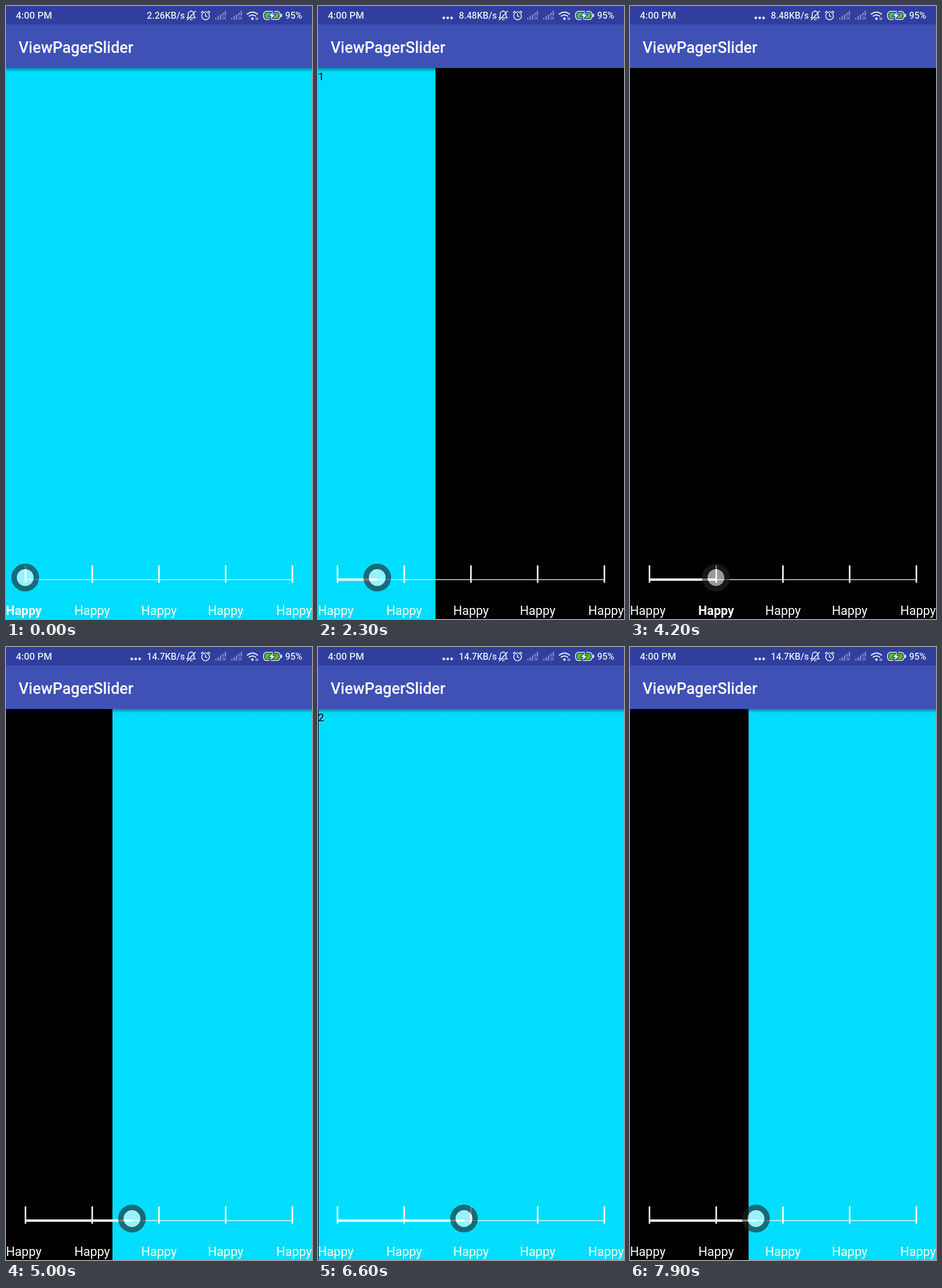
Recreate the animation shown at these times as an HTML page with a canvas. Size 529x1058 px, loop 8000 ms.

```html
<!DOCTYPE html>
<html lang="en">
<head>
<meta charset="utf-8">
<title>ViewPagerSlider</title>
<style>
  html, body { margin: 0; width: 100%; height: 100%; overflow: hidden; background: #000; }
  canvas { display: block; }
</style>
</head>
<body>
<canvas id="stage" width="529" height="1058"></canvas>
<script>
const W = 529, H = 1058, BAR = 107, LOOP = 8000, STEP = 100;
const CYAN = '#00ddff', ICON = '#e6e8f5', STATUS = '#303f9e';
const ctx = document.getElementById('stage').getContext('2d');
const tickX = i => 33.7 + 115.35 * i;

function rect(x, y, w, h, color) {
  ctx.fillStyle = color;
  ctx.fillRect(x, y, w, h);
}

function text(str, x, y, size, weight, color, align = 'left') {
  ctx.font = `${weight} ${size}px Roboto, sans-serif`;
  ctx.textAlign = align;
  ctx.fillStyle = color;
  ctx.fillText(str, x, y);
}

function disc(x, y, r, color) {
  ctx.beginPath();
  ctx.arc(x, y, r, 0, 7);
  ctx.fillStyle = color;
  ctx.fill();
}

function stroke(path, width, color = ICON) {
  ctx.lineWidth = width;
  ctx.strokeStyle = color;
  ctx.stroke(new Path2D(path));
}

// Remaining distance to the next page, shrinking exponentially to one pixel
const glide = (t, start, px, rate) =>
  Math.max(1, Math.round(px * Math.exp(-rate * (t - start) / 1000))) / W;

function pagePosition(t) {
  if (t < 2000) return 0;
  if (t < 4200) return 1 - glide(t, 2000, 528, 3.18);
  if (t < 4700) return 1;
  if (t < 7000) return 2 - glide(t, 5000, 184, 3.26);
  if (t < 7200) return 2;
  return 2 - 0.3875 * ((t - 7100) / 800) ** 1.5;
}

function drawPages(pos) {
  const page = Math.floor(pos);
  const edge = Math.round(W * (1 - pos + page));
  const color = i => i % 2 ? '#000' : CYAN;
  rect(0, BAR, edge, H - BAR, color(page));
  rect(edge, BAR, W - edge, H - BAR, color(page + 1));
  const selected = Math.round(pos);
  if (selected) text(selected, 0, 128, 18.9, 400, '#000');

  const shadow = ctx.createLinearGradient(0, BAR, 0, BAR + 7);
  shadow.addColorStop(0, 'rgba(0,0,0,.36)');
  shadow.addColorStop(1, 'rgba(0,0,0,0)');
  rect(0, BAR, W, 7, shadow);
}

function drawSlider(pos) {
  const value = Math.floor(pos * 10 + 1e-6) / 10;
  const x = tickX(value) - 0.5;
  rect(tickX(0), 989.4, tickX(4) - tickX(0), 1.3, '#fff');
  rect(tickX(0), 988, x - tickX(0), 4, '#fff');
  for (let i = 0; i < 5; i++) {
    rect(tickX(i) - 1.3, 965.5, 2.6, 30, '#fff');
    const center = [30.7, 149, 264.5, 379.7, 498][i];
    text('Happy', center, 1051, 21.6, i === value ? 700 : 400, '#fff', 'center');
  }
  ctx.beginPath();
  ctx.arc(x, 986.5, 24, 0, 7);
  ctx.arc(x, 986.5, 14.5, 0, 7);
  ctx.fillStyle = 'rgba(38,38,38,.62)';
  ctx.fill('evenodd');
  disc(x, 986.5, 14.5, 'rgba(255,255,255,.6)');
}

function drawSignal(x) {
  for (let i = 0; i < 5; i++) {
    const h = 3 + 3 * i;
    rect(x + 4.1 * i, 23.5 - h, 2.6, i > 2 ? h - 7 : h, '#7d87c4');
  }
  stroke(`M${x + 13} 18l6 5.5m0-5.5l-6 5.5`, 1.5, '#7d87c4');
}

function drawStatus(t) {
  rect(0, 0, W, 32, STATUS);
  text('4:00 PM', 17, 22.3, 16.8, 500, ICON);
  const speed = t < 700 ? '2.26' : t < 4700 ? '8.48' : '14.7';
  text(speed + 'KB/s', 243.5, 22.3, 15.8, 500, ICON);
  text('95%', 482.5, 22.3, 15.8, 500, ICON);

  ctx.globalAlpha = Math.max(0, Math.min(1, (t - 900) / 300));
  for (let i = 0; i < 3; i++) disc(217.5 + 6.7 * i, 20.5, 2.3, ICON);
  ctx.globalAlpha = 1;

  // muted bell and alarm clock
  stroke('M313 20.5h14l-2-3v-4c0-6-10-6-10 0v4zM318 23.5h4.5M320 9V7.5', 1.6);
  stroke('M313 24.5L328 8.5', 1.7);
  stroke('M338.3 17a6.7 6.7 0 1 0 13.4 0a6.7 6.7 0 1 0-13.4 0M345 13v4.5l3 1M337 11.5l4-3M353 11.5l-4-3', 1.6);

  drawSignal(361.5);
  drawSignal(389);

  // wifi
  stroke('M416.5 14.5q9.5-8 19 0M419.7 18q6.3-5 12.6 0', 2);
  disc(426, 21.8, 2.2, ICON);
  stroke('M432.5 24v-4m2.5 0v4', 1.2);

  // charging battery
  ctx.beginPath();
  ctx.roundRect(445.3, 9.3, 28.5, 14, 5);
  ctx.lineWidth = 1.6;
  ctx.strokeStyle = ICON;
  ctx.stroke();
  rect(475, 13.5, 2.2, 5.5, ICON);
  ctx.beginPath();
  ctx.roundRect(447.7, 11.6, 23.7, 9.4, 3);
  ctx.fillStyle = '#4cc21c';
  ctx.fill();
  const bolt = 'M462.5 9.5l-7.5 7.7h4.2l-2.4 6l7.7-8h-4.2z';
  stroke(bolt, 2.4, STATUS);
  ctx.fillStyle = '#fff';
  ctx.fill(new Path2D(bolt));
}

function draw(t) {
  const pos = pagePosition(t);
  drawPages(pos);
  drawSlider(pos);
  rect(0, 32, W, BAR - 32, '#3f51b5');
  text('ViewPagerSlider', 21.7, 80.7, 26.9, 500, '#fff');
  drawStatus(t);
}

function frame() {
  const t = performance.now() % LOOP;
  draw(Math.floor(t / STEP) * STEP);
  requestAnimationFrame(frame);
}
frame();
</script>
</body>
</html>
```
